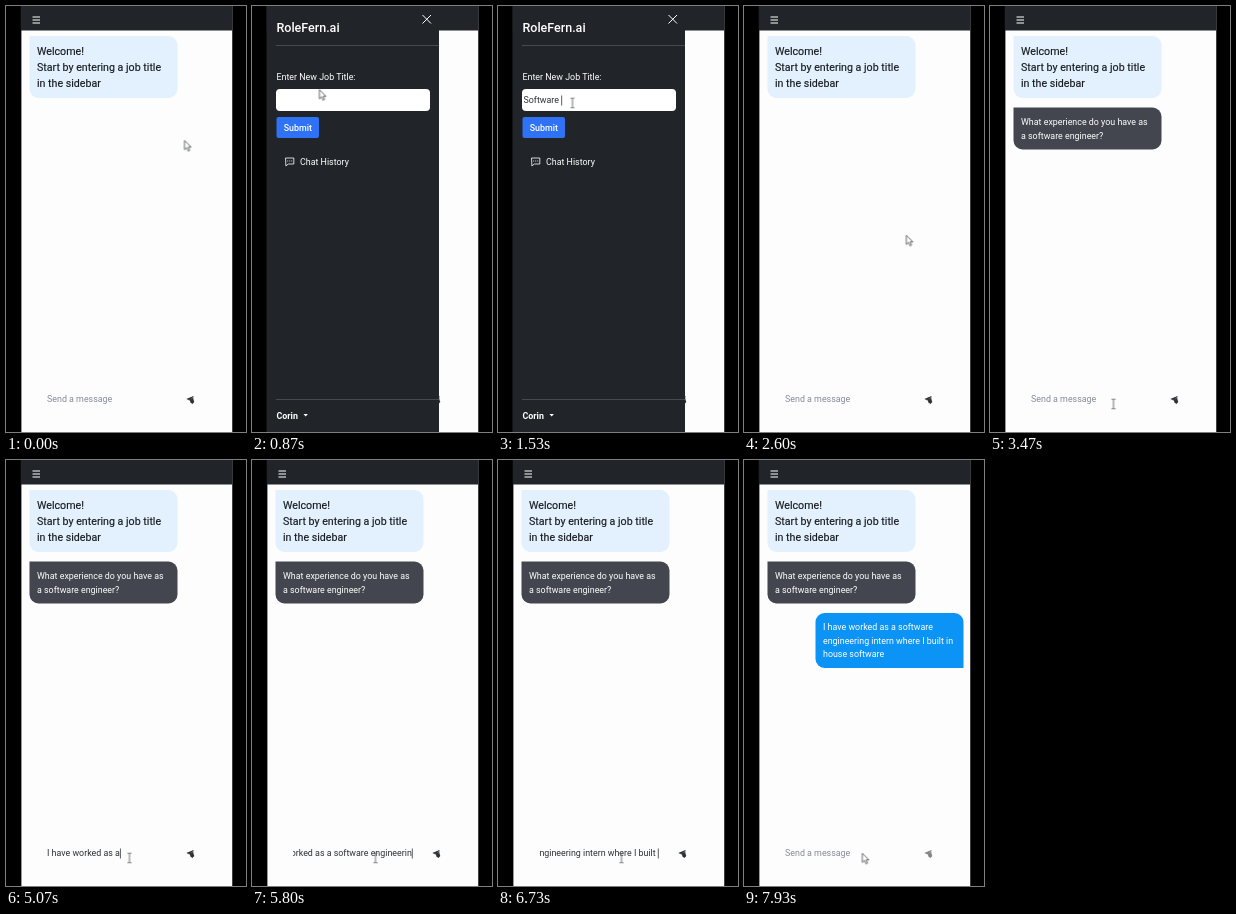
These frames come from a looping animation (240x426 px, 8 s). An HTML page:

```html
<!DOCTYPE html>
<html lang="en">
<head>
<meta charset="utf-8">
<title>Interview chat</title>
<style>
  html, body { margin: 0; width: 100%; height: 100%; overflow: hidden; background: #000; }
  svg { display: block; width: 100vw; height: 100vh; }
  text { font: 8.89px Roboto, sans-serif; white-space: pre; }
  .welcome text { font-size: 10.67px; fill: #16191d; stroke: #16191d; stroke-width: .15; }
  .light { fill: #fff; }
  .medium { font-weight: 500; }
  .title { font-size: 12.5px; font-weight: 500; }
  .hint { fill: #858a98; }
  .typed { fill: #2c3034; }
  .line { fill: none; stroke: #fff; }

  #sidebar, #question, #answer, #send, #pointer, #arrow, #beam { animation: 8s infinite; }
  #sidebar { animation-name: slide; animation-timing-function: ease-in-out; }
  #question { animation-name: ask; animation-timing-function: step-end; }
  #answer { animation-name: reply; animation-timing-function: step-end; }
  #send { animation-name: dim; animation-timing-function: step-end; }
  #pointer { animation-name: travel; animation-timing-function: ease-in-out; }
  #arrow { animation-name: arrow; animation-timing-function: step-end; }
  #beam { animation-name: beam; animation-timing-function: step-end; }

  @keyframes slide {
    0%, 6.5%, 31.5%, 100% { transform: translateX(-175px); }
    10%, 28.5% { transform: none; }
  }
  @keyframes ask { 0% { opacity: 0; } 41%, 100% { opacity: 1; } }
  @keyframes reply { 0% { opacity: 0; } 93.5%, 100% { opacity: 1; } }
  @keyframes dim { 0% { opacity: 1; } 93.5%, 100% { opacity: .6; } }
  @keyframes travel {
    0% { transform: translate(178.5px, 134.5px); }
    5.5%, 8% { transform: translate(30px, 14px); }
    12%, 24% { transform: translate(74.5px, 97px); }
    27%, 28.5% { transform: translate(46px, 122px); }
    32.5% { transform: translate(162.3px, 229.3px); }
    39%, 93.5% { transform: translate(123.5px, 398px); }
    98%, 100% { transform: translate(118.3px, 393.3px); }
  }
  @keyframes arrow {
    0%, 25%, 93.5%, 100% { opacity: 1; }
    11.5%, 38% { opacity: 0; }
  }
  @keyframes beam {
    0%, 25%, 93.5%, 100% { opacity: 0; }
    11.5%, 38% { opacity: 1; }
  }
</style>
</head>
<body>
<svg viewBox="0 0 240 426" preserveAspectRatio="none">
  <defs>
    <clipPath id="screen"><rect x="14.5" width="212" height="426"/></clipPath>
    <clipPath id="field"><rect x="41" y="382" width="120" height="24"/></clipPath>
  </defs>
  <rect width="240" height="426"/>
  <g clip-path="url(#screen)">
    <rect x="15.4" width="211.1" height="426" fill="#fdfdfd"/>
    <rect x="14.5" width="212" height="24.5" fill="#212529"/>
    <path class="line" d="M26.5 11h7.5m-7.5 3h7.5m-7.5 3h7.5"/>

    <g class="welcome">
      <path d="M23.5 30h139a9 9 0 0 1 9 9v44a9 9 0 0 1-9 9h-130a9 9 0 0 1-9-9z" fill="#e2f1fd"/>
      <text x="31" y="49">Welcome!</text>
      <text x="31" y="65">Start by entering a job title</text>
      <text x="31" y="80.7">in the sidebar</text>
    </g>
    <g id="question">
      <path d="M23.5 101.5h139a9 9 0 0 1 9 9v24a9 9 0 0 1-9 9h-130a9 9 0 0 1-9-9z" fill="#44464f"/>
      <text class="light" x="31" y="119.2">What experience do you have as</text>
      <text class="light" x="31" y="132.5">a software engineer?</text>
    </g>
    <g id="answer">
      <path d="M80.5 153h130a9 9 0 0 1 9 9v46h-139a9 9 0 0 1-9-9v-37a9 9 0 0 1 9-9z" fill="#0b93f6"/>
      <text class="light" x="79" y="170.3">I have worked as a software</text>
      <text class="light" x="79" y="183.7">engineering intern where I built in</text>
      <text class="light" x="79" y="197">house software</text>
    </g>

    <text id="hint" class="hint" x="41" y="396">Send a message</text>
    <g clip-path="url(#field)"><text id="message" class="typed" y="396"></text></g>
    <path id="message-caret" class="line" style="stroke:#33373c" stroke-width=".8" d="M0 388.5v10"/>
    <g id="send">
      <path d="M180.5 393l7.2-3-1 6.4z" fill="#777b80"/>
      <path d="M180.5 393l7.2-3-3.6 4zM184 394l3-2 1.3 4-1.8 2-2.2-1.5z" fill="#303336"/>
    </g>

    <g id="sidebar">
      <rect x="14.5" width="172.5" height="426" fill="#212529"/>
      <text class="light title" x="24.5" y="26">RoleFern.ai</text>
      <path class="line" d="M170.5 9l8.5 8.5m0-8.5l-8.5 8.5"/>
      <path class="line" style="stroke:#50555a" stroke-width=".8" d="M24 39.5h163M24 393.5h163"/>
      <text class="light" x="24.5" y="74.3">Enter New Job Title:</text>
      <rect class="light" x="24" y="83" width="154" height="22" rx="4"/>
      <text id="job" class="typed" x="25.5" y="97.3"></text>
      <path id="job-caret" class="line" style="stroke:#33373c" stroke-width=".8" d="M0 89.5v10"/>
      <rect x="24.5" y="111" width="42.5" height="21" rx="2" fill="#2f72f5"/>
      <text class="light medium" x="31.7" y="124.7">Submit</text>
      <path class="line" stroke-width=".8" d="M33.5 152h8.3v6h-5.6l-2.3 2zM35.2 155h1m1 0h1m1 0h1"/>
      <text class="light" x="48" y="159.3">Chat History</text>
      <text class="light" style="font-weight:700" x="24.5" y="412.7">Corin</text>
      <path class="light" d="M51.5 408h4.4l-2.2 2.4z"/>
    </g>
  </g>

  <g id="pointer">
    <path id="arrow" d="M0 0v9.2l2.2-2 1.5 3.3 1.6-.7-1.5-3.2h2.9z" fill="#fff" stroke="#45484c" stroke-width=".8"/>
    <path id="beam" class="line" style="stroke:#62666b" stroke-width=".9" d="M-2-4.8h1.3l.7.6.7-.6h1.3M0-4.2v8.4M-2 4.8h1.3l.7-.6.7.6h1.3"/>
  </g>
</svg>
<script>
  const LOOP = 8000;
  const $ = id => document.getElementById(id);
  const job = {
    text: "Software engineer", left: 25.5, right: 176, focus: 1020, clear: 2540,
    keys: [[1100, 0], [1530, 9.4], [1920, 17]]
  };
  const message = {
    text: "I have worked as a software engineering intern where I built in house software",
    left: 41, right: 159.8, focus: 4400, clear: 7480,
    keys: [[4400, 0], [5800, 38.4], [6730, 61.4], [7430, 78]]
  };

  function typedCount(keys, t) {
    if (t <= keys[0][0]) return 0;
    for (let i = 1; i < keys.length; i++) {
      const [t0, n0] = keys[i - 1], [t1, n1] = keys[i];
      if (t < t1) return Math.floor(n0 + (n1 - n0) * (t - t0) / (t1 - t0));
    }
    return keys.at(-1)[1];
  }

  function drawField(id, field, t) {
    const active = t >= field.focus && t < field.clear;
    const count = active ? typedCount(field.keys, t) : 0;
    const label = $(id), caret = $(id + "-caret");
    label.textContent = field.text.slice(0, count);
    const width = count ? label.getComputedTextLength() : 0;
    const x = Math.min(field.left, field.right - width);
    label.setAttribute("x", x);
    caret.setAttribute("transform", `translate(${x + width + .5} 0)`);
    caret.style.opacity = active ? 1 : 0;
    return count;
  }

  let start;
  function frame(now) {
    start ??= now;
    const t = (now - start) % LOOP;
    drawField("job", job, t);
    $("hint").style.opacity = drawField("message", message, t) ? 0 : 1;
    requestAnimationFrame(frame);
  }
  requestAnimationFrame(frame);
</script>
</body>
</html>
```
